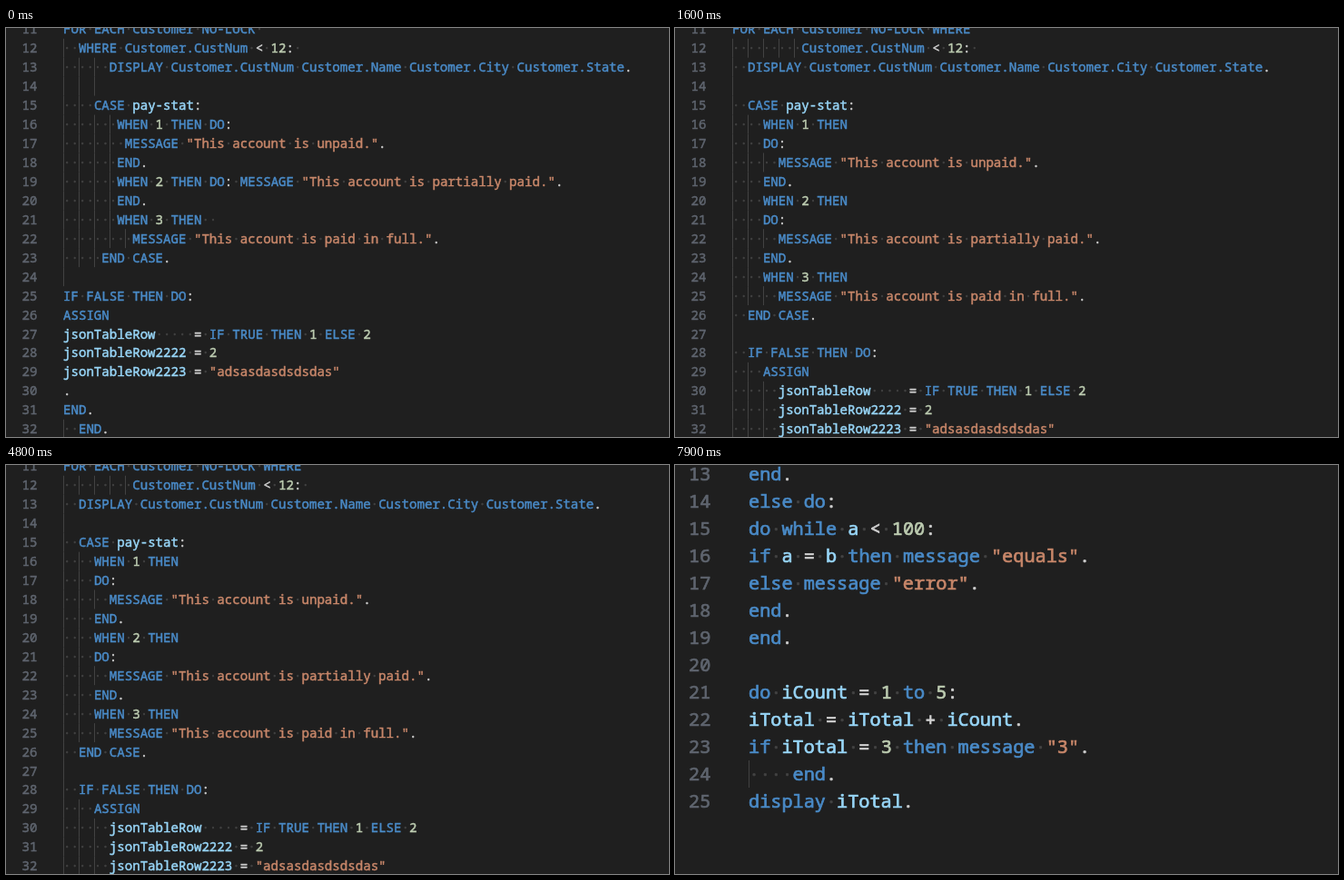
Recreate the animation shown at these times as an HTML page. Size 730 px wide and 450 px high, loop 8 s.

```html
<!DOCTYPE html>
<html lang="en">
<head>
<meta charset="utf-8">
<title>Code formatting</title>
<style>
  html, body { margin: 0; width: 100%; height: 100%; overflow: hidden; background: #1f1f1f; }
  svg { display: block; width: 730px; height: 450px; }
  text {
    font-family: "Noto Sans Mono", "DejaVu Sans Mono", monospace;
    white-space: pre;
    stroke-width: .035em;
  }
  text, tspan { fill: currentColor; stroke: currentColor; }
  .scene { filter: blur(.5px); }
  .keyword { color: #4a8bc8; }
  .variable { color: #98d6f8; }
  .string { color: #c8876a; }
  .number { color: #bccbb0; }
  .plain { color: #d0d0d0; }
  .gutter { color: #5f656f; }
  .space { color: #434343; }
  .guide { stroke: #424242; stroke-width: 1; }
</style>
</head>
<body>
<svg id="stage" viewBox="0 0 730 450"></svg>
<script>
const LOOP = 8000;
const stage = document.getElementById('stage');

const small = { size: 14.12, step: 8.47, left: 63, gutter: 17.5, pitch: 20.95, base: 6.3, indent: 2, first: 11 };
const large = { size: 20.23, step: 12.14, left: 81, gutter: 15, pitch: 30, base: 17.2, indent: 4, first: 13 };

const scenes = [
  { start: 0, ...small, blankGuides: { 14: 3, 24: 1 }, code:
`FOR EACH Customer NO-LOCK 
  WHERE Customer.CustNum < 12: 
      DISPLAY Customer.CustNum Customer.Name Customer.City Customer.State.

    CASE pay-stat:
       WHEN 1 THEN DO:
        MESSAGE "This account is unpaid.".
       END.
       WHEN 2 THEN DO: MESSAGE "This account is partially paid.".
       END.
       WHEN 3 THEN  
         MESSAGE "This account is paid in full.".
     END CASE.

IF FALSE THEN DO:
ASSIGN
jsonTableRow     = IF TRUE THEN 1 ELSE 2
jsonTableRow2222 = 2
jsonTableRow2223 = "adsasdasdsdsdas"
.
END.
  END.` },
  { start: 1600, ...small, blankGuides: { 14: 1, 27: 1 }, code:
`FOR EACH Customer NO-LOCK WHERE
         Customer.CustNum < 12: 
  DISPLAY Customer.CustNum Customer.Name Customer.City Customer.State.

  CASE pay-stat:
    WHEN 1 THEN
    DO:
      MESSAGE "This account is unpaid.".
    END.
    WHEN 2 THEN
    DO:
      MESSAGE "This account is partially paid.".
    END.
    WHEN 3 THEN
      MESSAGE "This account is paid in full.".
  END CASE.

  IF FALSE THEN DO:
    ASSIGN
      jsonTableRow     = IF TRUE THEN 1 ELSE 2
      jsonTableRow2222 = 2
      jsonTableRow2223 = "adsasdasdsdsdas"` },
  { start: 6900, ...large, blankGuides: {}, code:
`end.
else do:
do while a < 100:
if a = b then message "equals".
else message "error".
end.
end.

do iCount = 1 to 5:
iTotal = iTotal + iCount.
if iTotal = 3 then message "3".
    end.
display iTotal.` }
];

function add(parent, name, attrs, content) {
  const node = document.createElementNS('http://www.w3.org/2000/svg', name);
  for (const key in attrs) node.setAttribute(key, attrs[key]);
  if (content !== undefined) node.textContent = content;
  return parent.appendChild(node);
}

function tokenClass(token) {
  if (token[0] === '"') return 'string';
  if (/^\d/.test(token)) return 'number';
  if (/^(json|iTotal|iCount|pay-|[ab]$)/.test(token)) return 'variable';
  return /^[a-z]/i.test(token) ? 'keyword' : 'plain';
}

function drawLine(group, scene, line, index) {
  const row = scene.first + index;
  const y = scene.base + index * scene.pitch;
  const at = { y, 'font-size': scene.size };
  add(group, 'text', { ...at, x: scene.gutter, class: 'gutter' }, row);

  const indent = line.search(/\S/);
  const guides = indent < 0 ? scene.blankGuides[row] || 0 : Math.ceil(indent / scene.indent);
  const top = y - scene.pitch * 0.74;
  for (let i = 0; i < guides; i++) {
    const x = Math.round(scene.left + i * scene.indent * scene.step) + 0.5;
    add(group, 'line', { x1: x, x2: x, y1: top, y2: top + scene.pitch, class: 'guide' });
  }

  // Visible whitespace is a separate layer under the code.
  const dots = line.replace(/./g, c => c === ' ' ? '·' : ' ');
  add(group, 'text', { ...at, x: scene.left, class: 'space' }, dots);
  const text = add(group, 'text', { ...at, x: scene.left });
  for (const token of line.match(/"[^"]*"|\d+|[a-z][\w-]*(\.\w+)*|\s+|[^\w\s"]/gi) || [])
    add(text, 'tspan', { class: tokenClass(token) }, token);
}

const groups = scenes.map(scene => {
  const group = add(stage, 'g', { class: 'scene' });
  scene.code.split('\n').forEach((line, i) => drawLine(group, scene, line, i));
  return group;
});

function render(now) {
  const time = now % LOOP;
  const current = scenes.findLastIndex(scene => time >= scene.start);
  groups.forEach((group, i) => group.setAttribute('display', i === current ? 'inline' : 'none'));
}

function tick() {
  render(performance.now());
  requestAnimationFrame(tick);
}
tick();
</script>
</body>
</html>
```
